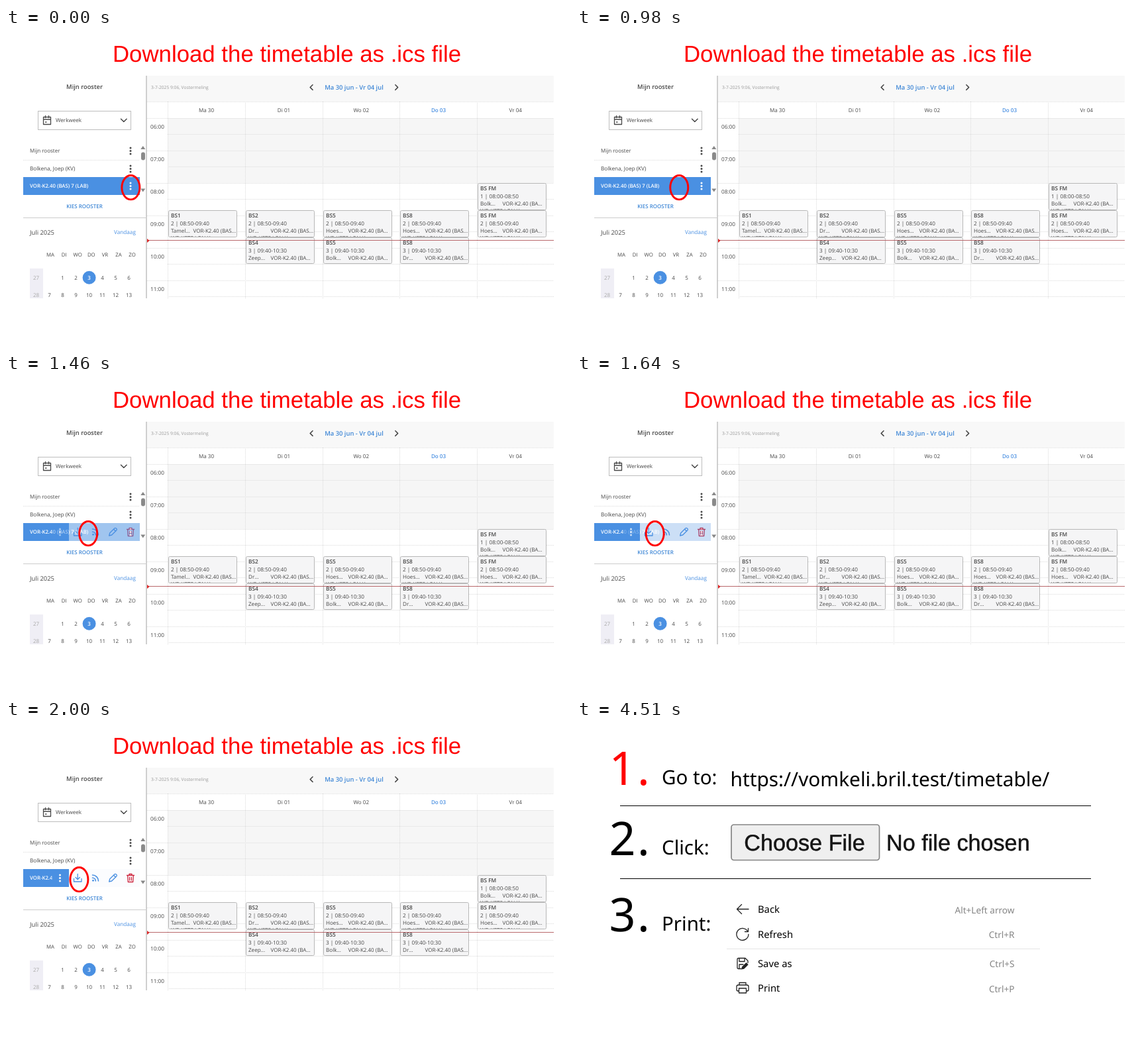
An HTML page that plays this animation: 853 px wide and 480 px high, repeating every 8 s.

```html
<!DOCTYPE html>
<html lang="en">
<head>
<meta charset="utf-8">
<title>Timetable export</title>
<style>
  html, body { margin: 0; width: 100%; height: 100%; overflow: hidden; background: #fff; }
  svg { display: block; width: 100vw; height: 100vh; }
  text { font-family: "Open Sans", "Noto Sans", sans-serif; white-space: pre; text-rendering: geometricPrecision; }
  .arial { font-family: "Liberation Sans", Arial, sans-serif; }
  .noto { font-family: "Noto Sans", "Open Sans", sans-serif; }
  .button { fill: #151515; stroke: #151515; stroke-width: .5; }
  .icon { fill: none; stroke-width: 1.3; stroke-linecap: round; stroke-linejoin: round; }
</style>
</head>
<body>
<svg id="stage" viewBox="0 0 853 480"></svg>
<script>
const BLUE = '#4a90e2', INK = '#484848', RED = '#ff0000';
const LOOP = 8000, SWITCH = 4510, STEP = 60, STEPS = 31, START = 440;
const COLS = [244, 361, 478, 594.5, 711.5, 827];
const GROUP = 'VOR-K2.40 (BAS) 7 (LAB)';

// Text is placed by the vertical middle of its capitals.
const text = (x, mid, size, str, attrs = '') =>
  `<text x="${x}" y="${mid + size * .357}" font-size="${size}" fill="${INK}" ${attrs}>${str}</text>`;
const centered = (x, mid, size, str, attrs = '') => text(x, mid, size, str, 'text-anchor="middle" ' + attrs);
const rect = (x, y, w, h, fill, attrs = '') =>
  `<rect x="${x}" y="${y}" width="${w}" height="${h}" fill="${fill}" ${attrs}/>`;
const icon = (d, color, attrs = '') => `<path class="icon" d="${d}" stroke="${color}" ${attrs}/>`;
const line = (d, color, attrs = '') => `<path d="${d}" stroke="${color}" fill="none" ${attrs}/>`;
const dotted = d => line(d, '#dcdcdc', 'stroke-dasharray="1 1"');
const kebab = (x, y, color) =>
  [-4.6, 0, 4.6].map(dy => `<circle cx="${x}" cy="${y + dy}" r="1.5" fill="${color}"/>`).join('');
const range = n => [...Array(n).keys()];
const tint = color => `style="fill:${color}"`;
const semi = color => `font-weight="600" ${tint(color)}`;

function sidebar() {
  const days = ['MA', 'DI', 'WO', 'DO', 'VR', 'ZA', 'ZO'];
  const dayNumbers = range(13).map(i => {
    const slot = i + 1, today = i === 2;
    return centered(65.5 + slot % 7 * 20, slot < 7 ? 377 : 403.5, 8, i + 1, today ? semi('#fff') : '');
  });
  return centered(118.5, 89, 9.3, 'Mijn rooster', 'font-weight="600"')
    + rect(48.5, 125.5, 140, 28, '#fff', 'stroke="#bdbdbd"')
    + icon('M56.5 134.5h11v11h-11zM56.5 138h11M59.5 132.5v3M64.5 132.5v3M59.5 142h1.5', INK)
    + text(75, 139.5, 8.1, 'Werkweek')
    + icon('M173.5 137.2l4.3 4.3 4.3-4.3', INK, 'style="stroke-width:1.5"')
    + text(36, 185.5, 8, 'Mijn rooster') + kebab(188, 185.5, INK)
    + dotted('M26 199.5H202')
    + text(36, 212.5, 8.2, 'Bolkena, Joep (KV)') + kebab(188, 212.5, INK)
    + '<path d="M203.3 183h7l-3.5-5zM203.3 242.5h7l-3.5 5z" fill="#888"/>'
    + rect(204, 187.5, 6, 12, '#8a8a8a', 'rx="3"')
    + centered(118.5, 269, 8, 'KIES ROOSTER', semi('#3f87d6'))
    + line('M26 286.5H211', '#ccc')
    + text(36, 308.5, 9.4, 'Juli 2025')
    + text(163, 308, 8.2, 'Vandaag', tint(BLUE))
    + days.map((d, i) => centered(67 + i * 20.6, 342, 7.8, d)).join('')
    + rect(36, 363, 20, 45, '#efeef5')
    + centered(45.5, 377, 8, 27, tint('#aaa')) + centered(45.5, 403.5, 8, 28, tint('#aaa'))
    + `<circle cx="125.6" cy="376.8" r="10" fill="${BLUE}"/>` + dayNumbers.join('');
}

function lesson([col, period, title, teacher, long]) {
  const x = Math.floor(COLS[col]) + 1.5, y = [234.5, 275.5, 316.5][period - 1];
  const times = ['08:00-08:50', '08:50-09:40', '09:40-10:30'][period - 1];
  const height = period === 3 ? 39 : 40;
  return `<svg x="${x - 1}" y="${y}" width="106" height="${height}">`
    + rect(1, 0, 103, height, '#f5f5f6', 'rx="2"')
    + text(4.5, 7.8, 8.3, title, 'font-weight="600"')
    + text(4.5, 19.2, 8.2, `${period} | ${times}`)
    + text(4.5, 30.5, 8.1, teacher + '...')
    + text(38, 30.5, 8, long ? 'VOR-K2.40 (BAS...' : 'VOR-K2.40 (BA...')
    + (period < 3 ? text(4.5, 41.2, 8.1, 'WD KETS LON K') : '') + '</svg>'
    + rect(x, y, 103, height, 'none', 'rx="2" stroke="#b8b8b8"');
}

function calendar() {
  const lessons = [
    [0, 2, 'BS1', 'Tamel', 1], [1, 2, 'BS2', 'Dr', 1], [1, 3, 'BS4', 'Zeep', 0],
    [2, 2, 'BS5', 'Hoes', 0], [2, 3, 'BS5', 'Bolk', 0], [3, 2, 'BS8', 'Hoes', 1],
    [3, 3, 'BS8', 'Dr', 1], [4, 1, 'BS FM', 'Bolk', 0], [4, 2, 'BS FM', 'Hoes', 0]
  ];
  const names = ['Ma 30', 'Di 01', 'Wo 02', 'Do 03', 'Vr 04'];
  return rect(213, 72, 614, 39, '#f8f8f8') + rect(244, 136, 583, 98, '#f6f6f6')
    + text(219, 89.5, 6.7, '3-7-2025 9:06, Vostermeling', tint('#999'))
    + icon('M463 85.8l-3.8 3.8 3.8 3.8M587.8 85.8l3.8 3.8-3.8 3.8', INK, 'style="stroke-width:1.5"')
    + centered(525.5, 89.5, 9.4, 'Ma 30 jun - Vr 04 jul', semi('#3f87d6'))
    + names.map((n, i) => centered((COLS[i] + COLS[i + 1]) / 2, 124, 8.1, n, i === 3 ? semi(BLUE) : '')).join('')
    + dotted('M213 111.5H827')
    + range(12).map(i => dotted(`M${i % 2 ? 244 : 213} ${Math.round(136 + i * 24.45) + .5}H827`)).join('')
    + COLS.slice(0, 5).map(x => dotted(`M${Math.floor(x) + .5} 111V408`)).join('')
    + range(6).map(i => text(218, 149 + i * 48.95, 8.2, String(6 + i).padStart(2, 0) + ':00')).join('')
    + rect(211, 72, 2, 336, '#cfcfcf')
    + lessons.map(lesson).join('')
    + line('M213 320.5H827', '#b9686c')
    + '<path d="M213 318l3.5 3-3.5 3z" fill="#d22"/>';
}

const closedRow = () => rect(26, 225, 176, 27, BLUE)
  + text(36, 238.5, 7.8, GROUP, semi('#fff')) + kebab(188, 238.5, '#fff');

const openRow = () => rect(26, 225, 69, 27, BLUE) + rect(95, 225, 107, 27, '#fff')
  + `<svg width="69.5" height="480">${text(36, 238.5, 7.8, GROUP, semi('#fff'))}</svg>` + kebab(81.5, 238.5, '#fff')
  + icon('M102.5 239.5v4.5h11.5v-4.5M108.2 232.5v8M105 237.5l3.2 3.2 3.2-3.2', BLUE)
  + icon('M130.5 238.2a4.8 4.8 0 0 1 4.8 4.8M130.5 234a9 9 0 0 1 9 9', BLUE, 'style="stroke-width:1.6"')
  + `<circle cx="131.5" cy="242.3" r="1.4" fill="${BLUE}"/>`
  + icon('M155.7 244l1-4 7.3-7.3q1-.8 2 0l1 1q.8 1 0 2l-7.3 7.3zM162.5 234.3l3 3', BLUE)
  + icon('M182.5 234.5h11M186 234.5v-2h4v2M183.7 234.5l.6 10h7.4l.6-10M186.6 237.5v4.5M189.4 237.5v4.5', '#d0243c');

function steps() {
  const black = tint('#000');
  const numbered = (n, base, label, color) =>
    `<text class="noto" x="48.5" y="${base}" font-size="70" font-weight="500" fill="${color}" letter-spacing="2.5">${n}.</text>`
    + `<text class="noto" x="128" y="${base - .5}" font-size="29.5">${label}</text>`;
  const menu = [['Back', 'Alt+Left arrow', 286], ['Refresh', 'Ctrl+R', 323.5],
                ['Save as', 'Ctrl+S', 367.5], ['Print', 'Ctrl+P', 405]];
  return numbered(1, 97.5, 'Go to:', RED) + numbered(2, 203.5, 'Click:', '#000') + numbered(3, 318.5, 'Print:', '#000')
    + '<text class="noto" x="231.5" y="100" font-size="29.8">https://vomkeli.bril.test/timetable/</text>'
    + line('M65 129.5H776M65 239.5H776', '#000')
    + rect(233, 158, 223.5, 53.5, '#efefef', 'rx="4" stroke="#858585" stroke-width="1.7"')
    + '<text class="arial button" x="252.3" y="196.5" font-size="34.2">Choose File</text>'
    + '<text class="arial button" x="467" y="196.5" font-size="34.2">No file chosen</text>'
    + menu.map(([label, keys, y]) => text(273, y, 14.8, label, `class="noto" ${black}`)
        + text(660.5, y + .8, 13.6, keys, `class="noto" text-anchor="end" ${tint('#858585')}`)).join('')
    + line('M226 345.5H699', '#e4e4e4')
    + icon('M259 285.5H241.5M248.5 278.5l-7 7 7 7', '#222')
    + icon('M258 319.5a9 9 0 1 0 .9 4M258.5 314.5v5h-5', '#222')
    + icon('M248 375.5h-4q-2 0-2-2v-12q0-2 2-2h10l4 4v3M245 359.5v5h8v-5M245 375v-6h6', '#222')
    + '<path d="M248 376.5l1-4 6.5-6.5 3.2 3.2-6.5 6.5z" fill="#222"/>'
    + icon('M244.5 409h-1.5q-2 0-2-2v-4.5q0-2.5 2.5-2.5h13q2.5 0 2.5 2.5v4.5q0 2-2 2h-1.5M245 400v-3.5h10v3.5M244.5 405h11v7h-11z', '#222');
}

const stage = document.getElementById('stage');
stage.innerHTML = `<rect width="853" height="480" fill="#fff"/>
  <g id="timetable">
    <text class="arial" x="424" y="51.3" font-size="34.8" text-anchor="middle" fill="${RED}">Download the timetable as .ics file</text>
    ${calendar()}${sidebar()}${closedRow()}
    <g id="open">${openRow()}</g>
    <ellipse id="ring" cy="240.7" rx="13.5" ry="18.2" fill="none" stroke="${RED}" stroke-width="2.9"/>
  </g>
  <g id="steps">${steps()}</g>`;
const [timetable, open, ring, stepList] =
  ['timetable', 'open', 'ring', 'steps'].map(id => document.getElementById(id));

const clamp = v => Math.min(1, Math.max(0, v));

// Cubic Bezier easing with handles (.25, .1) and (.35, 1).
function ease(u) {
  const curve = (s, a, b) => 3 * a * s * (1 - s) ** 2 + 3 * b * s * s * (1 - s) + s ** 3;
  let low = 0, high = 1;
  for (let i = 0; i < 20; i++) {
    const s = (low + high) / 2;
    if (curve(s, .25, .35) < u) low = s; else high = s;
  }
  return curve(low, .1, 1);
}

function draw(now) {
  const t = now % LOOP;
  const u = clamp(Math.floor((t - START) / STEP) / STEPS);
  ring.setAttribute('cx', 188.4 - 79.6 * ease(u));
  open.setAttribute('opacity', 1 - (1 - clamp((u - .41) / .5)) ** 2);
  timetable.style.display = t < SWITCH ? '' : 'none';
  stepList.style.display = t < SWITCH ? 'none' : '';
  requestAnimationFrame(draw);
}
draw(performance.now());
</script>
</body>
</html>
```
